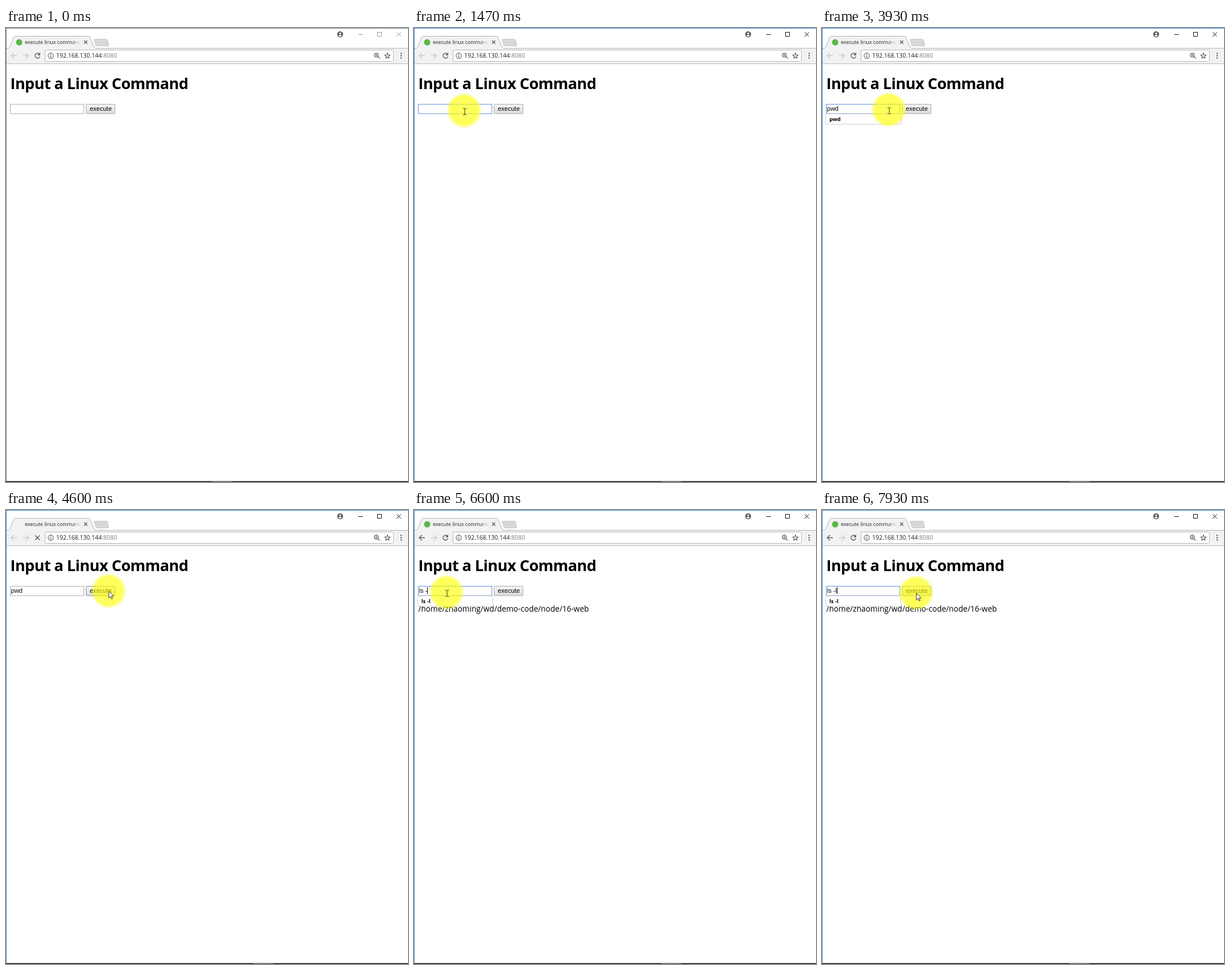
An HTML page for the animation above (8000 ms loop, 705 by 795 pixels).

```html
<!DOCTYPE html>
<html lang="en">
<head>
<meta charset="utf-8">
<title>execute linux command</title>
<style>
html, body { margin: 0; width: 100%; height: 100%; overflow: hidden; background: #fff; }
svg { display: block; width: 705px; height: 795px; }
text { font-family: "Open Sans", "Noto Sans", sans-serif; white-space: pre; }
.arial { font-family: "Liberation Sans", Arial, sans-serif; font-size: 11px; }
.line { fill: none; stroke: #5a5a5a; stroke-width: 1.4; }
.hit { font-size: 9.4px; font-weight: 700; }
</style>
</head>
<body>
<svg viewBox="0 0 705 795">
  <defs>
    <radialGradient id="glow">
      <stop offset=".8" stop-color="#ff0" stop-opacity=".64"/>
      <stop offset=".92" stop-color="#ff0" stop-opacity=".3"/>
      <stop offset="1" stop-color="#ff0" stop-opacity="0"/>
    </radialGradient>
    <linearGradient id="face" x2="0" y2="1">
      <stop stop-color="#f6f6f6"/><stop offset="1" stop-color="#dcdcdc"/>
    </linearGradient>
    <linearGradient id="fade">
      <stop stop-color="#f2f2f2" stop-opacity="0"/><stop offset="1" stop-color="#f2f2f2"/>
    </linearGradient>
    <clipPath id="tab"><rect x="30" y="15" width="101" height="19"/></clipPath>
  </defs>

  <rect width="705" height="795" fill="#fff"/>

  <!-- tab strip and toolbar -->
  <rect y="36" width="705" height="26" fill="#f2f2f2"/>
  <path d="M0 35.5H4.500Q6 35 7 32.500L13.500 16Q14.500 14.500 16 14.500H144.500Q146 14.500 147 16L154 32.500Q155 35.500 157 35.500H705" fill="#f2f2f2" stroke="#b2b2b2"/>
  <path d="M5 35.500H156" stroke="#f2f2f2"/>
  <path d="M155.500 19.500H175Q177 19.500 178 21L180 29.500Q180.500 31.500 179 31.500H160.500Q158.500 31.500 157.500 29.500L154.500 21Q154 19.500 155.500 19.500Z" fill="#d8d8d8" stroke="#c8c8c8"/>
  <path d="M0 62.500H705" stroke="#bcbcbc"/>
  <circle id="icon" cx="23" cy="25" r="5.500" fill="#5cb847"/>
  <g clip-path="url(#tab)">
    <text x="33" y="28" font-size="8.9" fill="#222">execute linux command</text>
    <rect x="115" y="15" width="16" height="19" fill="url(#fade)"/>
  </g>
  <path class="line" d="M137 22L142.500 27.500M142.500 22L137 27.500"/>

  <circle cx="586" cy="11" r="5.200" fill="#5f5f5f"/>
  <circle cx="586" cy="9.300" r="1.600" fill="#fff"/>
  <path d="M582.800 13.400Q586 10.600 589.200 13.400Q586 16 582.800 13.400Z" fill="#fff"/>
  <path id="controls" fill="none" d="M618 11.500H626M651.500 7.500H658.500V14.500H651.500ZM685 7.500L692.500 15M692.500 7.500L685 15"/>

  <path id="back" class="line" d="M19 48.500H9.500M14 43.700L9.200 48.500L14 53.300"/>
  <path class="line" style="stroke:#cbcbcb" d="M30 48.500H39.500M35 43.700L39.800 48.500L35 53.300"/>
  <g id="reload">
    <path class="line" d="M58.800 46A4.300 4.300 0 1 0 59.300 50"/>
    <path d="M60 43V47.800H55.200Z" fill="#5a5a5a"/>
  </g>
  <path id="stop" class="line" d="M51 44.500L59 52.500M59 44.500L51 52.500"/>

  <rect x="68.500" y="38.500" width="611" height="20" rx="2" fill="#fff" stroke="#b6b6b6"/>
  <circle class="line" cx="78.500" cy="48.500" r="4.600" style="stroke-width:1.100"/>
  <path class="line" d="M78.500 47.800V51M78.500 45.500V46.700"/>
  <text x="88" y="52" font-size="10.450" fill="#222">192.168.130.144<tspan fill="#808080">:8080</tspan></text>
  <circle class="line" cx="649.500" cy="47.500" r="3.400" style="stroke-width:1.200"/>
  <path class="line" style="stroke-width:1.200" d="M652 50L655.500 53.500M647.800 47.500H651.200M649.500 45.800V49.200"/>
  <path id="star" class="line" style="stroke-width:1.100"/>
  <g fill="#5a5a5a">
    <circle cx="693" cy="44.500" r="1.200"/><circle cx="693" cy="48.500" r="1.200"/><circle cx="693" cy="52.500" r="1.200"/>
  </g>

  <!-- page -->
  <text x="7.500" y="107" font-size="27" font-weight="700" letter-spacing="-.53">Input a Linux Command</text>
  <rect id="field" x="7.500" y="133.500" width="129" height="16.500" fill="#fff"/>
  <text id="typed" class="arial" x="8.800" y="145"></text>
  <rect id="caret" y="135" width="1" height="12"/>
  <rect id="button" x="140.500" y="133.500" width="50.500" height="16.500" rx="1" fill="url(#face)"/>
  <text class="arial" x="147" y="145">execute</text>
  <text id="output" x="7.500" y="178" font-size="13.620">/home/zhaoming/wd/demo-code/node/16-web</text>
  <g id="list">
    <rect id="panel" x="6.500" y="150.500" width="132" fill="#fff" stroke="#d2d2d2"/>
    <text class="hit" x="13" y="163"></text>
    <text class="hit" x="13" y="181"></text>
    <text class="hit" x="13" y="199"></text>
  </g>

  <!-- window edges -->
  <path id="edge" d="M.5 794V.5H705" fill="none"/>
  <rect y="793" width="705" height="1" fill="#8a8f94"/>
  <rect y="794" width="705" height="1" fill="#111"/>
  <rect id="task" y="794" width="35" height="1" fill="#666"/>

  <g id="mouse">
    <circle r="31" fill="url(#glow)"/>
    <path id="arrow" d="M.5 .5V12.500L3.300 9.900L5.200 14.200L7 13.400L5.100 9.200H8.900Z" fill="#fff" stroke="#222" stroke-width=".9"/>
    <path id="beam" d="M-2 -3.500H0L1 -2.500L2 -3.500H4M1 -2.500V6.500M-2 7.500H0L1 6.500L2 7.500H4" fill="none" stroke="#333"/>
  </g>
</svg>
<script>
const $ = id => document.getElementById(id);
const LOOP = 8000, RATE = 0.015;
const START = 4, FOCUS = 14, CLICK = 68, LOADED = 70;

// step, x, y
const path = [
  [4, 620, 40], [5, 480, 75], [7, 290, 118], [9, 178, 134], [10, 151.5, 137],
  [12, 108, 140], [14, 90, 141.5], [15, 88, 141.5], [16, 88, 141.5], [17, 88, 146],
  [18, 88, 144.5], [57, 88, 144.5], [58, 103, 143], [59, 117, 143], [62, 155, 141],
  [65, 174, 141], [69, 180, 141.5], [70, 181, 141.5], [71, 178, 140], [73, 130, 140],
  [75, 68, 144], [76, 57, 144], [112, 57, 144], [113, 70, 143], [115, 125, 140],
  [117, 166, 142], [119, 165, 145]
];
const typing = [[0, ""], [42, "p"], [44, "pw"], [48, "pwd"], [70, ""],
  [89, "l"], [92, "ls"], [95, "ls "], [99, "ls -"], [102, "ls -l"]];
const hits = [[0, []], [43, ["pwd"]], [CLICK, []], [90, ["ls -l", "ls /", "ls"]],
  [92, ["ls -l", "ls /"]], [99, ["ls -l"]]];
const blink = [[0, 0], [14, 1], [22, 0], [30, 1], [38, 0], [42, 1], [56, 0], [64, 1],
  [67, 0], [76, 1], [84, 0], [89, 1], [110, 0], [118, 1]];

const at = (table, k) => table.filter(row => row[0] <= k).pop()[1];
const show = (id, on) => $(id).style.display = on ? "" : "none";
const paint = (id, color) => $(id).setAttribute("stroke", color);

function place(k) {
  const i = path.findIndex(p => p[0] > k);
  if (i < 1) return path[i < 0 ? path.length - 1 : 0].slice(1);
  const [k0, x0, y0] = path[i - 1], [k1, x1, y1] = path[i];
  const f = (k - k0) / (k1 - k0);
  return [x0 + (x1 - x0) * f, y0 + (y1 - y0) * f];
}

const star = Array.from({ length: 10 }, (_, i) => {
  const r = i % 2 ? 2.2 : 5, a = i * Math.PI / 5;
  return (669 + r * Math.sin(a)).toFixed(1) + " " + (48.8 - r * Math.cos(a)).toFixed(1);
});
$("star").setAttribute("d", "M" + star.join("L") + "Z");

const pen = document.createElement("canvas").getContext("2d");
pen.font = '11px "Liberation Sans", Arial, sans-serif';
const rows = document.querySelectorAll(".hit");

function draw(k) {
  const active = k >= FOCUS;
  const loading = k >= CLICK && k < LOADED;
  const focused = active && k < 67 || k >= 76;
  const [x, y] = place(k);
  const inField = x > 7 && x < 137 && y > 133 && y < 151;
  const overButton = k >= START && x > 140 && x < 191 && y > 133 && y < 151;

  paint("edge", active ? "#2f86d6" : "#71899c");
  paint("controls", active ? "#111" : "#999");
  $("task").setAttribute("x", active ? 434 : 362);
  show("icon", !loading);
  show("reload", !loading);
  show("stop", loading);
  $("back").style.stroke = k >= LOADED ? "#5a5a5a" : "#cbcbcb";
  show("output", k >= LOADED);

  const text = at(typing, k);
  $("typed").textContent = text;
  paint("field", focused ? "#5f8fdd" : "#adadad");
  show("caret", at(blink, k));
  $("caret").setAttribute("x", Math.round(8.8 + pen.measureText(text).width));
  paint("button", overButton ? "#8c8c8c" : "#a9a9a9");

  const list = at(hits, k);
  show("list", list.length);
  $("panel").setAttribute("height", 18 * list.length);
  rows.forEach((row, i) => row.textContent = list[i] || "");

  show("mouse", k >= START);
  $("mouse").setAttribute("transform", `translate(${x} ${y})`);
  show("arrow", !inField);
  show("beam", inField);
}

const begin = performance.now();
function tick(now) {
  const t = Math.max(0, now - begin) % LOOP;
  draw(Math.min(119, Math.floor((t + 4) * RATE)));
  requestAnimationFrame(tick);
}
draw(0);
requestAnimationFrame(tick);
</script>
</body>
</html>
```
